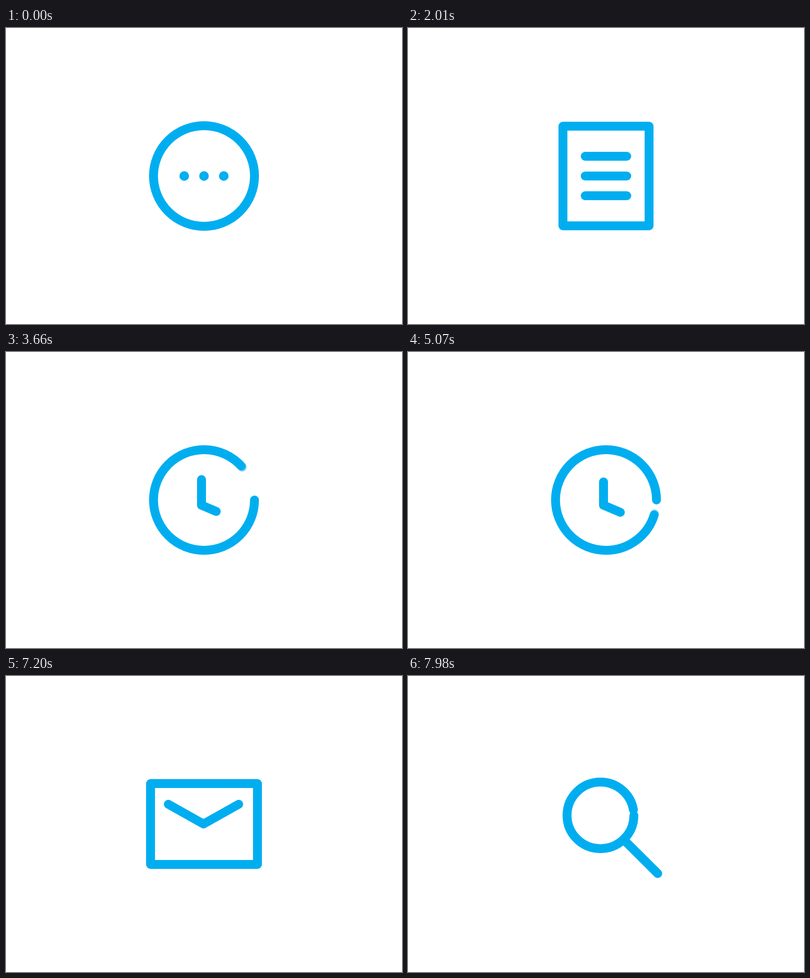
These frames come from a looping animation (800x600 px, 8 s). An HTML page with a canvas:

```html
<!DOCTYPE html>
<html lang="en">
<head>
<meta charset="utf-8">
<title>Icon loop</title>
<style>
  html, body { margin: 0; width: 100%; height: 100%; overflow: hidden; background: #fff; }
  canvas { display: block; }
</style>
</head>
<body>
<canvas id="stage" width="800" height="600"></canvas>
<script>
const LOOP = 8000, SHUTTER = 8, SAMPLES = 12;
const stage = document.getElementById('stage').getContext('2d');
const layer = document.createElement('canvas');
layer.width = 800;
layer.height = 600;
const ctx = layer.getContext('2d');

const ramp = (t, start, duration) => Math.min(1, Math.max(0, (t - start) / duration));
const easeIn = (t, start, duration) => ramp(t, start, duration) ** 2;
const easeOut = (t, start, duration) => 1 - (1 - ramp(t, start, duration)) ** 2;
const easeOutQuart = (t, start, duration) => 1 - (1 - ramp(t, start, duration)) ** 4;
const easeInOut = (t, start, duration) => {
  const u = ramp(t, start, duration);
  return u < .5 ? 4 * u ** 3 : 1 - 4 * (1 - u) ** 3;
};

// Strokes the part of a path between the fractions from and to.
function trim(path, length, from, to) {
  if (to <= from) return;
  const whole = from === 0 && to === 1;
  ctx.setLineDash(whole ? [] : [length * (to - from), length * 2]);
  ctx.lineDashOffset = -length * from;
  ctx.stroke(path);
  ctx.setLineDash([]);
}

function polyline(points, from, to, closed) {
  const path = new Path2D();
  let length = 0;
  points.forEach(([x, y], i) => {
    path.lineTo(x, y);
    const next = points[i + 1] || (closed ? points[0] : points[i]);
    length += Math.hypot(next[0] - x, next[1] - y);
  });
  if (closed) path.closePath();
  trim(path, length, from, to);
}

function ring(x, y, r, turn, from, to) {
  const path = new Path2D();
  const start = (turn - 90) * Math.PI / 180;
  path.arc(x, y, r, start, start + 2 * Math.PI);
  path.closePath();
  trim(path, 2 * Math.PI * r, from, to);
}

const line = (x1, y1, x2, y2) => polyline([[x1, y1], [x2 + .01, y2]], 0, 1);

function more(t) {
  const gone = easeIn(t, 750, 348);
  ring(400, 300, 102 - gone, gone, gone, 1);
}

function dotsToLines(t) {
  const turn = easeInOut(t, 750, 440);
  const angle = turn * Math.PI / 2;
  const erase = easeIn(t, 2910, 380);
  if (erase === 1) return;
  ctx.lineWidth = 18 + 1.4 * (1 - turn);
  for (const i of [-1, 0, 1]) {
    const x = 400 + 40 * i * Math.cos(angle);
    const y = 300 + 40 * i * Math.sin(angle);
    const delay = -40 * i;
    const left = x - 42 * easeOut(t, 1230 + delay, 400);
    const right = x + 42 * easeOutQuart(t, 1280 + delay, 900);
    line(left + (right - left) * erase, y, right, y);
  }
  ctx.lineWidth = 18;
}

function page(t) {
  const corners = [[400, 199], [487, 199], [487, 401], [313, 401], [313, 199]];
  polyline(corners, easeIn(t, 2910, 348), easeOut(t, 1100, 610), true);
}

function clock(t) {
  const gone = easeIn(t, 4950, 560);
  ring(400, 300, 102, 0, gone, easeOut(t, 3260, 610));
  const hands = [[395, 258.5], [395, 310.5], [429, 325]];
  polyline(hands, easeIn(t, 4950, 520), easeOut(t, 3290, 480));
}

function mail(t) {
  const drawn = easeOut(t, 5597, 490);
  const gone = easeIn(t, 7200, 348);
  const rest = 1 - drawn;
  const w = 108 - 1.8 * rest;
  const corners = [[400 + w, 300], [400 + w, 382], [400 - w, 382], [400 - w, 218], [400 + w, 218]];
  polyline(corners, gone, drawn, true);
  const shift = 7.7 * rest;
  const flap = [[328, 260], [399, 300], [470, 260]].map(([x, y]) => [x + shift, y]);
  polyline(flap, gone, drawn);
}

function search(t) {
  ring(388.8, 282.5, 67.5, -4.3, 0, easeOut(t, 7550, 518));
  polyline([[437, 333], [504.5, 400.5]], 0, easeOut(t, 7560, 430));
}

function drawScene(t) {
  ctx.fillStyle = '#fff';
  ctx.fillRect(0, 0, 800, 600);
  ctx.strokeStyle = '#00aef0';
  ctx.lineWidth = 18;
  ctx.lineCap = ctx.lineJoin = 'round';
  for (const part of [more, dotsToLines, page, clock, mail, search]) part(t);
}

// Averages several moments within the shutter time for motion blur.
function render(now) {
  const t = now % LOOP;
  for (let i = 0; i < SAMPLES; i++) {
    drawScene(t + SHUTTER * ((i + .5) / SAMPLES - .5));
    stage.globalAlpha = 1 / (i + 1);
    stage.drawImage(layer, 0, 0);
  }
}

const origin = performance.now();
function tick() {
  render(performance.now() - origin);
  requestAnimationFrame(tick);
}
tick();
</script>
</body>
</html>
```
